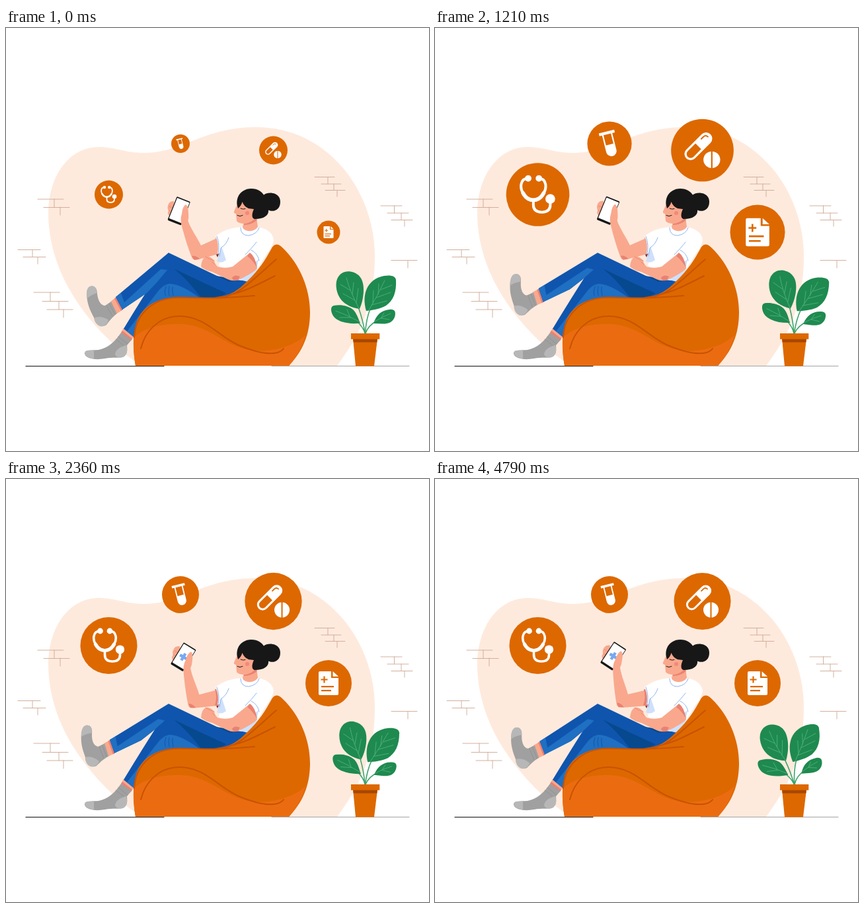
Animation, 640 px wide and 640 px high, one loop 7210 ms. Source, as an HTML page:

```html
<!DOCTYPE html>
<html lang="en">
<head>
<meta charset="utf-8">
<title>Health at home</title>
<style>
html, body { margin: 0; height: 100%; overflow: hidden; background: #fff; }
svg { display: block; width: 100vw; height: 100vh; }
.line { fill: none; stroke-linecap: round; stroke-linejoin: round; }
.main { fill: #dd6800; }
.skin { fill: #f9a88d; }
.skin-dark { fill: #e98272; }
.jeans { fill: #0f55ae; }
.jeans-light { fill: #1f6fc2; }
.sock { fill: #a0a0a0; }
.sock-light { fill: #b7b7b7; }
.ink { fill: #171717; }
.shade { fill: #cfe0fb; }
.leaf { fill: #1e8a4f; }
.seam { stroke: #c95200; stroke-width: 2; }
.white { fill: #fff; }
.white-line { stroke: #fff; }
.gap { stroke: #dd6800; }
</style>
</head>
<body>
<svg viewBox="0 0 640 640">
  <path fill="#feeadd" d="M140 180C165 180 180 189 210 189C265 189 300 150 378 150C490 150 558 250 558 345C558 420 535 465 501 511H205C150 475 64 390 64 280C64 225 95 180 140 180Z"/>

  <path class="line" stroke="#cfa893" stroke-width=".9" d="M48 259h39M73 259v12M57 271.500h39M82 271v12
    M18 335.500h34M40 336v10M26 346.500h34M48 347v10
    M42 400h39M67 400v13M55 413.500h39M80 414v12M62 426h39M87 426v12
    M467 225.500h30M487 226v10M477 236h30M496 236v9M483 245.500h30M501 246v9
    M567 269h32M587.500 269v11M577 280h32M598 280v10M583 290.500h32M603 291v9
    M583 351.500h39M608 352v11"/>
  <path class="line" stroke="#333" stroke-width="1.3" d="M30 511.700H239"/>
  <path class="line" stroke="#8c8c8c" stroke-width=".8" d="M402 511.500H610"/>

  <g id="stethoscope">
    <circle class="main" r="43"/>
    <g class="line white-line">
      <path stroke-width="3.600" d="M-13 -22C-25 -22 -24 -8 -20 -2Q-15 7 -6 7Q3 7 8 -2C12 -8 13 -22 1 -22M-6 7V14Q-6 24 5.500 24Q17 24 17 14V6"/>
      <path stroke-width="5.200" d="M-20 -2Q-15 7.500 -6 7.500Q3 7.500 8 -2"/>
    </g>
    <circle class="white" cx="-13" cy="-22" r="4.400"/>
    <circle class="white" cx="1.500" cy="-22" r="4.400"/>
    <circle class="white" cx="17" cy="6" r="6.600"/>
  </g>
  <g id="tube">
    <circle class="main" r="28"/>
    <g transform="rotate(-14)">
      <path stroke="#fff" stroke-width="3.600" d="M-10 -14H10"/>
      <path class="line white-line" stroke-width="1.800" d="M-5.700 -13V9.500A5.700 5.700 0 0 0 5.700 9.500V-13"/>
      <path class="white" d="M-6 1H6V9.500A6 6 0 0 1 -6 9.500Z"/>
    </g>
  </g>
  <g id="pills">
    <circle class="main" r="43"/>
    <g transform="translate(-5.500 -5.500) rotate(-45)">
      <rect class="line white-line" stroke-width="3" x="-22" y="-7" width="44" height="14" rx="7"/>
      <path class="white" d="M0 -8H15A8 8 0 0 1 15 8H0Z"/>
      <path class="line gap" stroke-width="1.800" d="M10 -4.300H14Q18.300 -4.300 18.500 0"/>
    </g>
    <circle class="white" cx="13" cy="13" r="11.500"/>
    <path class="line gap" stroke-width="2" d="M13 1V25"/>
  </g>
  <g id="report">
    <circle class="main" r="35"/>
    <path class="white" d="M-13 -18H4V-8H15V16q0 2 -2 2H-13q-2 0 -2 -2V-16q0 -2 2 -2ZM6.500 -18L15 -10.200H6.500Z"/>
    <path fill="none" class="gap" stroke-width="2.200" d="M-11.500 -5.500h10M-6.500 -10.500v10M-11 5.200H8M-11 11.200H4"/>
  </g>

  <g id="plant">
    <path class="line" stroke="#3fa468" stroke-width="1.600" d="M543 462Q541 445 533 422M543.500 462Q545 440 551 425M543 462Q541 453 530 443M544 462Q548 450 561 443"/>
    <path class="leaf" d="M535 425C512 422 500 408 499.500 389C499.500 374 510 367 521 368.500C536 371 541 382 541 396C541 408 538 418 535 425Z"/>
    <path class="leaf" d="M545 428C538 405 545 380 572 375C582 373.500 589 375 590 381C591 400 586 412 575 420C566 425 555 427 545 428Z"/>
    <path class="leaf" d="M536 446.500C522 448.500 505 446 497 438C491 431 490 421 496 420C506 418 518 420 525 426C531 432 533 440 536 446.500Z"/>
    <path class="leaf" d="M556 447C560 434 568 427 580 426C588 425 590 429 588.500 436C586 445 579 447.500 570 447.500Z"/>
    <path class="line" stroke="#4fb07c" stroke-width=".9" d="M534 424Q520 398 515 378M530 416L533 394M524 403L526 385M528 412L510 402M521 397L506 388
      M549 427Q562 405 573 382M555 417L556 397M563 403L564 387M553 419L576 413M560 408L582 400M567 396L584 389
      M534 444Q516 434 499 428M520 436L516 426M522 438L505 438
      M558 444Q571 436 582 432M568 438L572 431M567 439L580 441"/>
  </g>
  <path class="main" d="M525 470H562L557 511.500H529Z"/>
  <path fill="#a84800" d="M525 470H562L561.400 475.500H525.700Z"/>
  <rect class="main" x="522" y="462" width="43.300" height="8.800"/>

  <g id="seated">
    <path class="skin" d="M178 454L194 467L189 473L174 461Z"/>
    <path class="skin-dark" d="M176 458L191 470L189 473L174 461Z"/>
    <path class="sock" d="M174 461L190 472L183 480C184 490 183 497 174 498.500C165 499 160 498 150 500C135 503 119 500 119 492C120 486 130 488 140 487C155 484 165 474 174 461Z"/>
    <path class="sock-light" d="M133 488Q125 487 120 489Q117 498 133 500.500ZM182 480Q186 493 177 498Q168 500 165 494Q166 484 182 480Z"/>
    <path class="line" stroke="#8d8d8d" stroke-width=".7" d="M170 467L184 478M166 471L178 480"/>
    <path class="jeans" d="M236 362L262 362L350 385L330 409L240 420L194 468L178 455Q204 412 236 362Z"/>
    <path class="jeans-light" d="M247 387Q264 387 294 409L230 414L194 468L183 459Q210 424 232 396Q239 388 247 387Z"/>
    <path class="line" stroke="#0f55ae" stroke-width=".9" d="M242 391Q239 398 241 405M247 391Q245 398 247 405M252 392Q251 398 253 405"/>
    <path fill="#06498f" d="M254 364L365 383L320 409H296Q276 382 254 364Z"/>

    <g id="calf">
      <path class="skin" d="M167 407L158 414L168 432L177 426Z"/>
      <path class="skin-dark" d="M167 407L164 409.300L174 428L177 426Z"/>
      <path class="sock" d="M159 414L150 420C143 420 139 412 138 402C138 393 133 389 128 391C121 394 122 404 123 412C125 424 130 432 134 440C136 450 146 454 152 449C156 444 160 438 168 432Z"/>
      <path class="sock-light" d="M137.500 401Q130 403 122.500 409Q120 393 128 390.500Q137 389 137.500 401ZM133 439Q142 434 155 441.500Q152 452 143 451.500Q135 449 133 439Z"/>
      <path class="line" stroke="#8d8d8d" stroke-width=".7" d="M152 420L161 436M156 417L165 433"/>
      <path class="jeans" d="M246 340L166 407L176 426L213 401Q230 384 246 364Z"/>
      <path class="jeans-light" d="M166 407L174 401L179 415L234 365L244 366Q230 384 213 401L176 426Z"/>
    </g>
    <path class="jeans" d="M246 340L338 384L372 380L366 402L332 408L335 402Q300 386 262 368Q250 361 236 363Z"/>

    <path fill="#7a3038" d="M315 337L324 338L320 347Z"/>
    <g id="arm">
      <path class="skin" d="M254 262Q248 262 246 266Q243 273 246 276Q243 282 248 285L258 286Z"/>
      <path class="line" stroke="#e98272" stroke-width=".7" d="M247 270L253 272M246 276L252 278"/>
      <path class="skin" d="M328 314L295 329C290 318 280 305 275 291L265 290L266 300C270 315 276 335 282 349Q285 352 292 350L328 340Z"/>
      <path class="skin-dark" d="M281 345Q288 344 293 349.500L285 351ZM317 317L328 314V340L321 341Q323 328 317 317Z"/>
      <g transform="translate(261.700 276.800) rotate(21.800)">
        <rect class="ink" x="-11" y="-19.200" width="22" height="38.400" rx="1.600"/>
        <rect class="white" x="-9.800" y="-17.500" width="20" height="33.300" rx=".8"/>
        <path id="cross" fill="none" stroke="#79a8f0" stroke-width="4.400" d="M-6 0H6M0 -6V6"/>
      </g>
      <path class="skin" d="M266 299Q263 290 266 281Q267 270 272 267Q276 270 276 280Q277 287 275 293Z"/>
    </g>

    <path class="white" d="M317 315Q333 302 358 301H381Q403 305 405 321Q402 333 395 341L380 365L364 382L340 381L322 359L327 341H320Q323 328 317 315Z"/>
    <path class="shade" d="M322 344L326 330L333 351Q326 357 319 353ZM366 362L382 350L379 367L366 384L354 381Z"/>
    <path class="skin" d="M361 290L379 286L381 301Q376 308 366 307Q358 305 358 301Z"/>
    <path class="skin-dark" d="M360 296Q372 295 379 286L379.500 291Q371 298 360 298Z"/>
    <path class="line" stroke="#82aef2" stroke-width=".9" d="M355 302Q355 314 367 314Q380 312 383 302M337 317Q334 327 325 333L323 345M379 324Q372 333 362 343M319 315Q324 328 321 342M371 336Q381 341 383 352"/>

    <path class="skin" d="M352 262L345 277.500Q344 280 348 281L349 292Q352 296 361 296Q374 294 379 284L375 262Z"/>
    <circle cx="365" cy="280" r="3" fill="#f28878"/>
    <path class="ink" d="M349.500 267C348 252 359 243 371 243C381 243 387 248 390 252.500C396 247 415 248 415 263C415 276 404 279 397 275.500C398 282 392 289 376 289C371 287 372 281 375 274L367 273Q360 270 357.500 263Q356 269 351 273Z"/>
    <path class="line" stroke="#171717" stroke-width="1" d="M355 273Q359 275 362 273.500M350 283.500Q354 286 358 283.500"/>

    <path class="skin" d="M369 340Q376 352 380 364Q372 372 352 381Q343 384 335 380L312 369Q300 366 295 361Q296 349 302 346Q308 344 315 352Q316 358 321 361.500Q333 364 343 361Z"/>
    <path class="skin-dark" d="M369 340Q377 345 380 363Q374 352 365 345ZM342 378Q346 372 354 376L351 381.500Q344 384 342 378Z"/>
    <path class="line" stroke="#e98272" stroke-width=".8" d="M302 346Q307 350 315 352M312 354L316 358"/>
  </g>

  <g id="beanbag">
    <path class="main" d="M196 511C192 485 192 470 195 455C200 425 225 407 262 407L318 408.500C340 405 352 396 364 384C384 365 393 349 401 335C405 326 411 325 419 333C445 358 460 395 460 430C460 465 448 490 428 511Z"/>
    <path fill="#eb6c10" d="M196 511C192 490 193 475 194 468C210 452 240 447 265 448C300 449 320 470 350 482C385 496 430 486 453 465C449 480 440 498 428 511Z"/>
    <path class="line seam" d="M204 485C210 460 230 436 263 436C300 436 320 465 350 479C380 492 400 494 411 491Q417 489 420 485M409 350C390 366 375 382 355 396C342 405 330 408 315 408.500M407 375C385 386 365 397 345 402Q330 407 315 408.500M194 468C196 430 225 408 262 407.500L300 408.500C330 409 350 407 376 405"/>
  </g>
</svg>
<script>
const LOOP = 7210, STEP = 1000 / 14, LAST_STEP = 67;
const $ = id => document.getElementById(id);
const place = (id, transform) => $(id).setAttribute('transform', transform);

// Eased value through [time, value] keys, held outside them.
function track(t, keys) {
  if (t <= keys[0][0]) return keys[0][1];
  for (let i = 1; i < keys.length; i++) {
    const [t0, a] = keys[i - 1], [t1, b] = keys[i];
    if (t < t1) {
      const u = (t - t0) / (t1 - t0);
      return a + (b - a) * u * u * (3 - 2 * u);
    }
  }
  return keys[keys.length - 1][1];
}

const badges = [
  { id: 'stethoscope', x: 155.5, y: 252, peak: 833 },
  { id: 'tube', x: 264, y: 175, peak: 1230 },
  { id: 'pills', x: 404.5, y: 185, peak: 1590 },
  { id: 'report', x: 488, y: 309, peak: 1080 }
];
const SETTLE = 833;
const joints = [
  { id: 'calf', pivot: '246 340', keys: [[0, 0], [1430, 9.3], [2000, 9.3], [2900, 7]] },
  { id: 'arm', pivot: '310 312', keys: [[950, 0], [2830, 11.5]] },
  { id: 'plant', pivot: '543.5 461', keys: [[0, 0], [1600, 5.4], [4800, -6.4]] }
];

function draw(t) {
  for (const { id, x, y, peak } of badges) {
    const scale = track(t, [[0, .5], [peak, 1.2], [peak + SETTLE, 1]]);
    place(id, `translate(${x} ${y}) scale(${scale})`);
  }
  for (const { id, pivot, keys } of joints) place(id, `rotate(${track(t, keys)} ${pivot})`);
  place('cross', `scale(${track(t, [[1430, 0], [2200, 1]])})`);
}

const start = performance.now();
function tick() {
  const t = (performance.now() - start) % LOOP;
  draw(Math.min(LAST_STEP, Math.floor(t / STEP + .1)) * STEP);
  requestAnimationFrame(tick);
}
tick();
</script>
</body>
</html>
```
